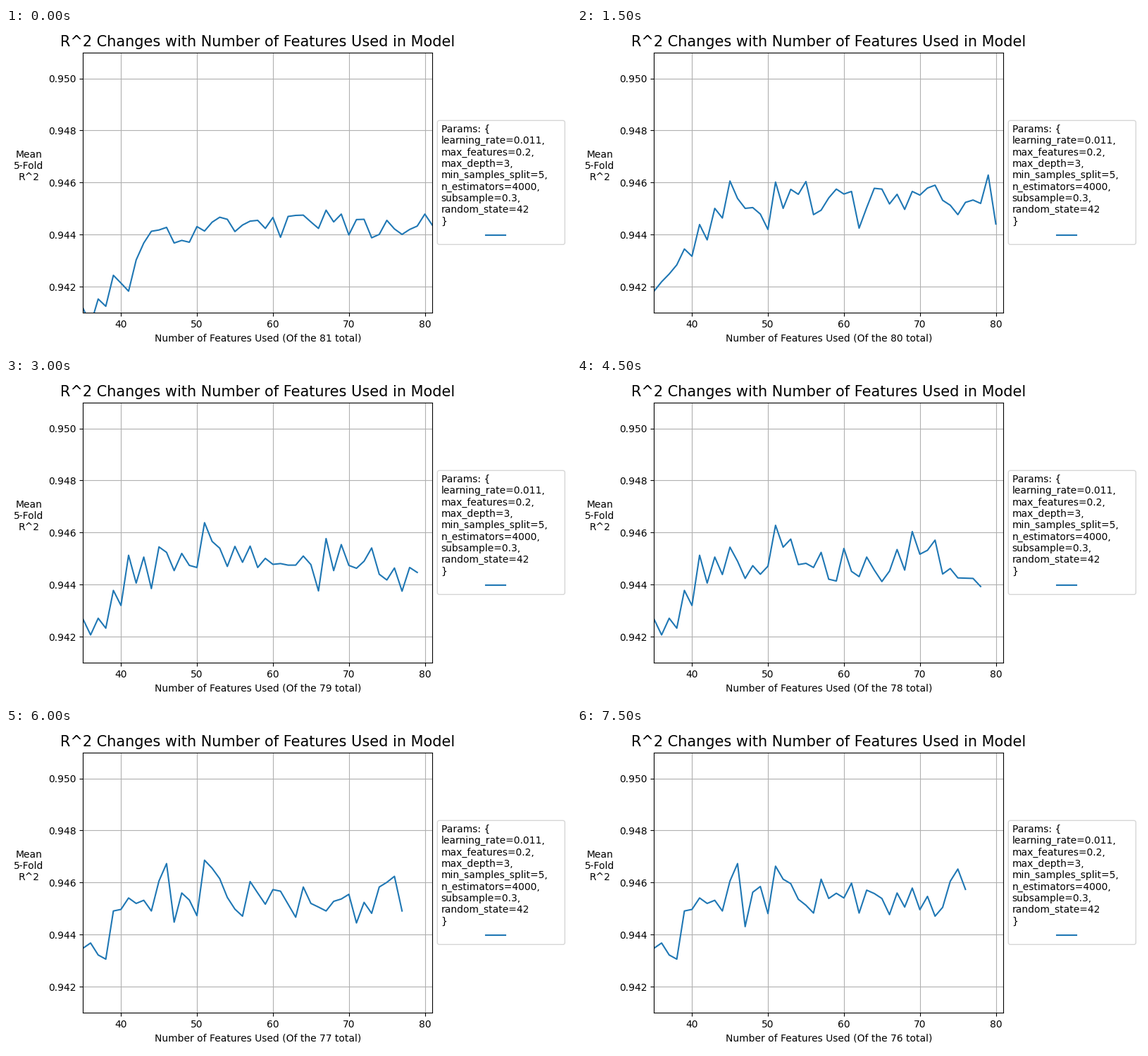
Recreate the animation shown at these times as a matplotlib script. Size 802 by 457 pixels, loop 8000 ms.

```python
import matplotlib.pyplot as plt
from matplotlib.animation import FuncAnimation
from matplotlib.lines import Line2D
from matplotlib.patches import FancyBboxPatch

W, H, DPI = 802, 457, 100
LEFT, TOP, AX_W, AX_H = 109.3, 34.6, 496, 369.6
FIRST = 35           # feature count at the left edge
TICK, HOLD = 500, 3  # ms per frame, frames per curve

plt.rcParams["font.family"] = "DejaVu Sans"

# Scores in units of 1e-5 above 0.94, one per feature count from FIRST on
total_81 = [118, 54, 153, 125, 244, 214, 183, 303, 368, 413, 418, 428,
            368, 378, 371, 431, 414, 448, 467, 459, 412, 437, 452, 455,
            424, 466, 390, 470, 474, 475, 449, 424, 494, 449, 479, 399,
            458, 459, 388, 401, 455, 422, 401, 420, 433, 479, 436]
total_80 = [183, 219, 249, 284, 345, 317, 439, 380, 501, 464, 606, 539,
            501, 504, 479, 420, 602, 501, 574, 555, 604, 477, 494, 541,
            575, 556, 566, 425, 504, 578, 575, 518, 555, 497, 566, 552,
            579, 590, 532, 513, 477, 524, 533, 520, 629, 441]
total_79 = [268, 207, 271, 233, 378, 320, 513, 406, 506, 385, 545, 524,
            454, 520, 474, 466, 638, 566, 540, 470, 547, 486, 548, 466,
            501, 478, 481, 475, 475, 510, 477, 376, 577, 454, 554, 474,
            463, 490, 541, 440, 418, 464, 375, 466, 447]
total_78 = total_79[:9] + [
    439, 544, 490, 424, 473, 440, 471, 628, 544, 575, 477, 482, 466,
    524, 421, 414, 539, 451, 431, 506, 456, 412, 452, 535, 456, 604,
    517, 532, 571, 441, 462, 426, 425, 424, 393]
total_77 = [348, 368, 322, 306, 491, 497, 541, 520, 532, 491, 606, 673,
            448, 560, 533, 473, 686, 655, 615, 543, 498, 471, 604, 560,
            517, 573, 567, 517, 467, 583, 520, 506, 491, 528, 537, 555,
            445, 524, 482, 583, 601, 624, 491]
total_76 = total_77[:12] + [
    431, 563, 585, 481, 663, 613, 596, 536, 513, 483, 613, 539, 559,
    541, 598, 483, 571, 558, 539, 477, 560, 506, 579, 496, 547, 471,
    505, 605, 652, 574]
curves = [total_81, total_80, total_79, total_78, total_77, total_76]

PARAMS = """Params: {
learning_rate=0.011,
max_features=0.2,
max_depth=3,
min_samples_split=5,
n_estimators=4000,
subsample=0.3,
random_state=42
}"""

fig = plt.figure(figsize=(W / DPI, H / DPI), dpi=DPI, facecolor="white")
ax = fig.add_axes([LEFT / W, 1 - (TOP + AX_H) / H, AX_W / W, AX_H / H])
ax.set_xlim(FIRST, 81)
ax.set_ylim(0.941, 0.951)
ax.set_xticks(range(40, 81, 10))
ax.set_yticks([0.942 + 0.002 * i for i in range(5)])
ax.yaxis.set_major_formatter("{x:.3f}")
ax.grid(True)
ax.set_title("R^2 Changes with Number of Features Used in Model", fontsize=15)
ax.set_ylabel("Mean\n5-Fold\nR^2", rotation=0, labelpad=20)
xlabel = ax.set_xlabel("")
curve, = ax.plot([], [], color="C0", lw=1.5)


def add_key(x, y, w, h):
    """Parameter box, placed in pixels from the top left corner."""
    fig.add_artist(FancyBboxPatch(
        (x, H - y - h), w, h, transform=None, lw=1, fc="white", ec="#cccccc",
        alpha=0.8, boxstyle="round,pad=0,rounding_size=2.78"))
    fig.text((x + 5.2) / W, 1 - (y + 5.8) / H, PARAMS, va="top")
    row = H - y - 162.7
    fig.add_artist(Line2D([x + 68.6, x + 96.4], [row, row],
                          transform=None, color="C0", lw=1.5))


add_key(612.3, 131.3, 181, 176)


def draw(frame):
    scores = curves[frame // HOLD]
    counts = range(FIRST, FIRST + len(scores))
    curve.set_data(counts, [0.94 + s * 1e-5 for s in scores])
    xlabel.set_text(f"Number of Features Used (Of the {counts[-1]} total)")
    return curve, xlabel


anim = FuncAnimation(fig, draw, frames=16, interval=TICK, repeat=True,
                     repeat_delay=0, blit=False)
plt.show()
```
